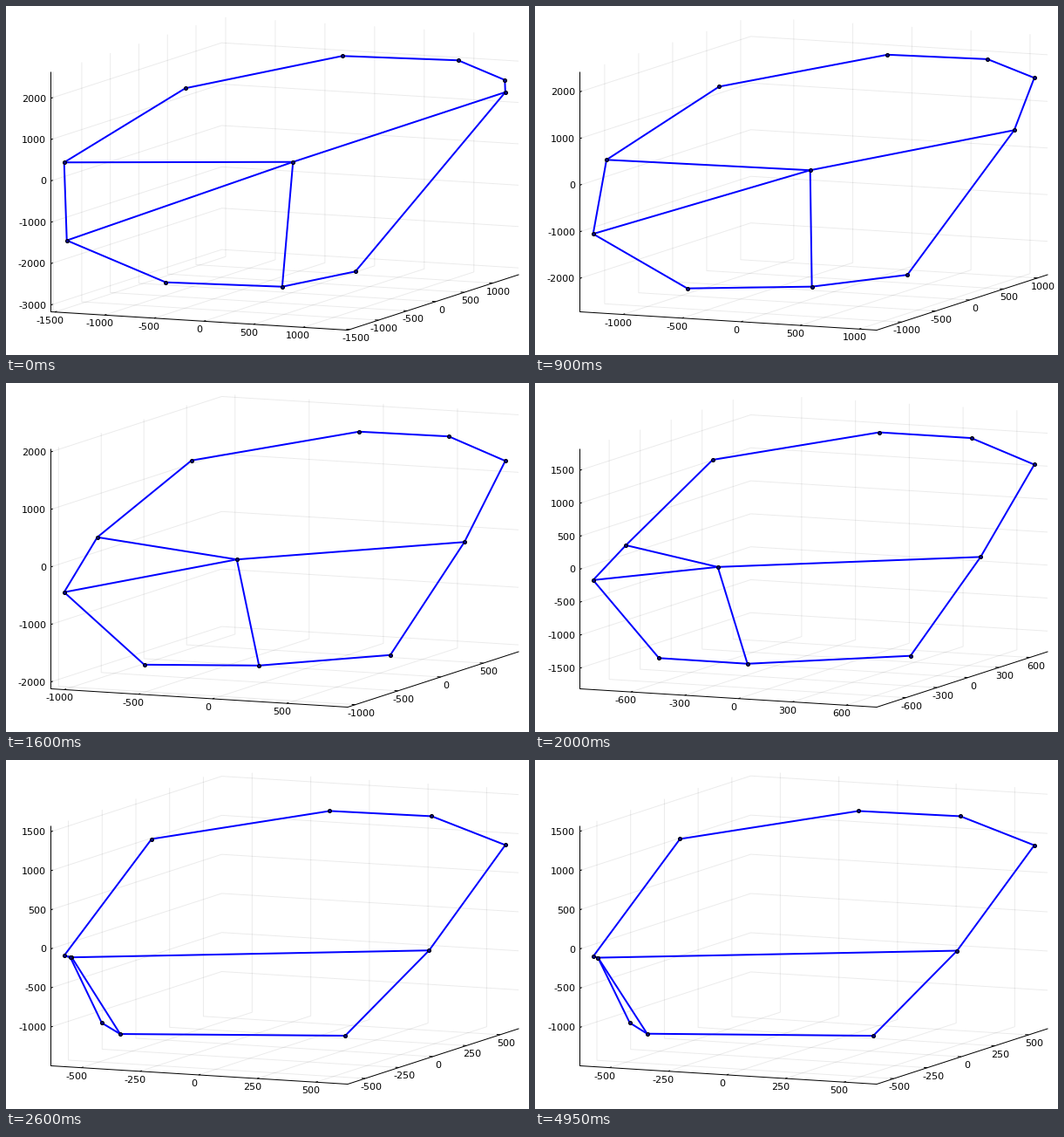
A matplotlib script for the animation above (5000 ms loop, 600x400 px).

```python
import numpy as np
import matplotlib.pyplot as plt
from matplotlib.animation import FuncAnimation
from matplotlib.collections import LineCollection

W, H, DPI = 600, 400, 100
FRAMES, INTERVAL = 100, 50
PX = 72 / DPI

# Screen position of the box's left bottom corner and its three edges
ORIGIN = np.array([51.5, 350.5])
EDGE_X = np.array([340.5, 21.0])
EDGE_Y = np.array([196.0, -63.5])
EDGE_Z = np.array([0.0, -274.5])

# The net lies in the plane x = y: each node is a series of (x, z) waypoints,
# the last being the rest position it settles into.
TIMES = np.array([0, 900, 1600, 2000, 2560.0])
SETTLE = 700
PATHS = {
    "A": [(-1455, 422), (-1221, 497), (-891, 452), (-721, 308), (-594, -100), (-590, -111)],
    "B": [(-680, 1983), (-616, 1875), (-488, 1657), (-414, 1499), (-357, 1304), (-355, 1301)],
    "C": [(323, 2462), (288, 2273), (229, 1927), (175, 1715), (125, 1482), (128, 1477)],
    "D": [(1064, 2135), (826, 2007), (613, 1721), (501, 1518), (401, 1311), (404, 1307)],
    "E": [(1362, 1570), (1077, 1527), (855, 1217), (724, 1040), (600, 868), (604, 862)],
    "F": [(1365, 1274), (969, 439), (680, -138), (534, -296), (394, -404), (395, -404)],
    "G": [(8, -6), (-127, -73), (-294, -127), (-396, -132), (-573, -130), (-577, -130)],
    "H": [(-1438, -1470), (-1293, -1069), (-1033, -458), (-837, -181), (-577, -129), (-577, -130)],
    "I": [(-805, -2673), (-787, -2398), (-690, -1829), (-604, -1443), (-492, -1000), (-491, -992)],
    "J": [(-61, -3002), (-118, -2572), (-199, -2002), (-291, -1635), (-442, -1161), (-444, -1149)],
    "K": [(407, -2774), (395, -2482), (363, -2000), (286, -1711), (167, -1411), (168, -1404)],
}
LINKS = "AB BC CD DE EF FG FK AG AH HG HI IJ JK GJ".split()

names = list(PATHS)
links = np.array([[names.index(a), names.index(b)] for a, b in LINKS])
waypoints = np.array([PATHS[n] for n in names], float).transpose(1, 0, 2)
moving, rest = waypoints[:-1], waypoints[-1]
slopes = np.gradient(moving, TIMES, axis=0, edge_order=2)


def nodes_at(t):
    """Node positions: a cubic through the waypoints, then a decay to rest."""
    if t >= TIMES[-1]:
        return rest + (moving[-1] - rest) * np.exp((TIMES[-1] - t) / SETTLE)
    i = np.searchsorted(TIMES, t, side="right") - 1
    h = TIMES[i + 1] - TIMES[i]
    s = (t - TIMES[i]) / h
    return ((1 + 2 * s) * (1 - s) ** 2 * moving[i]
            + s * (1 - s) ** 2 * h * slopes[i]
            + s * s * (3 - 2 * s) * moving[i + 1]
            + s * s * (s - 1) * h * slopes[i + 1])


def limits(values):
    lo, hi = values.min(), values.max()
    pad = 0.03 * (hi - lo)
    return lo - pad, hi + pad


def nice_ticks(lo, hi):
    """Choose 4 to 8 round ticks, weighing count, coverage and niceness."""
    best, best_score = np.array([]), -1
    for power in (10, 100, 1000):
        for q, nice in ((1, 1), (5, 0.9), (2, 0.7), (2.5, 0.5), (3, 0.2)):
            step = q * power
            ticks = np.arange(np.ceil(lo / step), np.floor(hi / step) + 1) * step
            n = len(ticks)
            if not 4 <= n <= 8:
                continue
            cover = 1.5 * (hi - lo) / (ticks[-1] - ticks[0])
            score = (1 - abs(n - 5) / 5) / 4 + cover / 3 + nice / 4
            if score > best_score:
                best, best_score = ticks, score
    return best


def project(u, v, w):
    return ORIGIN + u * EDGE_X + v * EDGE_Y + w * EDGE_Z


fig = plt.figure(figsize=(W / DPI, H / DPI), dpi=DPI, facecolor="white")
ax = fig.add_axes([0, 0, 1, 1])
ax.set_xlim(0, W)
ax.set_ylim(H, 0)
ax.axis("off")


def add_lines(color, width, z):
    return ax.add_collection(LineCollection([], colors=[color], linewidths=width * PX, zorder=z),
                             autolim=False)


grid = add_lines((0, 0, 0, 0.08), 1, 1)
marks = add_lines("black", 1, 2)
net = add_lines("#0000ff", 2, 4)
frame_line = [project(0, 0, 1), project(0, 0, 0), project(1, 0, 0), project(1, 1, 0)]
ax.plot(*zip(*frame_line), color="black", lw=PX, zorder=2)
dots, = ax.plot([], [], "o", ms=4 * PX, mfc="#00008b", mec="black", mew=PX, zorder=5)
labels = [ax.text(0, 0, "", fontsize=8, family="DejaVu Sans", va="baseline", zorder=3)
          for _ in range(24)]


def draw(i):
    pts = nodes_at(i * INTERVAL)
    (x0, x1), (z0, z1) = limits(pts[:, 0]), limits(pts[:, 1])
    u = (pts[:, 0] - x0) / (x1 - x0)
    w = (pts[:, 1] - z0) / (z1 - z0)
    xy = np.array([project(a, a, b) for a, b in zip(u, w)])

    wires, nubs, texts = [], [], []
    for value in nice_ticks(x0, x1):
        f = (value - x0) / (x1 - x0)
        on_x, on_y = project(f, 0, 0), project(1, f, 0)
        wires.append([on_x, project(f, 1, 0), project(f, 1, 1)])
        wires.append([on_y, project(0, f, 0), project(0, f, 1)])
        nubs.append([on_x, on_x + 0.012 * EDGE_Y])
        nubs.append([on_y, on_y - 0.012 * EDGE_X])
        texts.append((on_x + (-5.5, 13), value, "center"))
        texts.append((on_y + (6.5, 13), value, "center"))
    for value in nice_ticks(z0, z1):
        f = (value - z0) / (z1 - z0)
        on_z = project(0, 0, f)
        wires.append([on_z, project(0, 1, f), project(1, 1, f)])
        nubs.append([on_z, on_z + 0.012 * EDGE_Y])
        texts.append(((46, on_z[1] + 4), value, "right"))

    grid.set_segments(wires)
    marks.set_segments(nubs)
    net.set_segments(xy[links])
    dots.set_data(xy[:, 0], xy[:, 1])
    for label in labels:
        label.set_text("")
    for label, (pos, value, align) in zip(labels, texts):
        label.set_position(pos)
        label.set_text(f"{value:.0f}" if value else "0")
        label.set_ha(align)
    return [grid, marks, net, dots, *labels]


anim = FuncAnimation(fig, draw, frames=FRAMES, interval=INTERVAL, repeat=True, repeat_delay=0)
plt.show()
```
